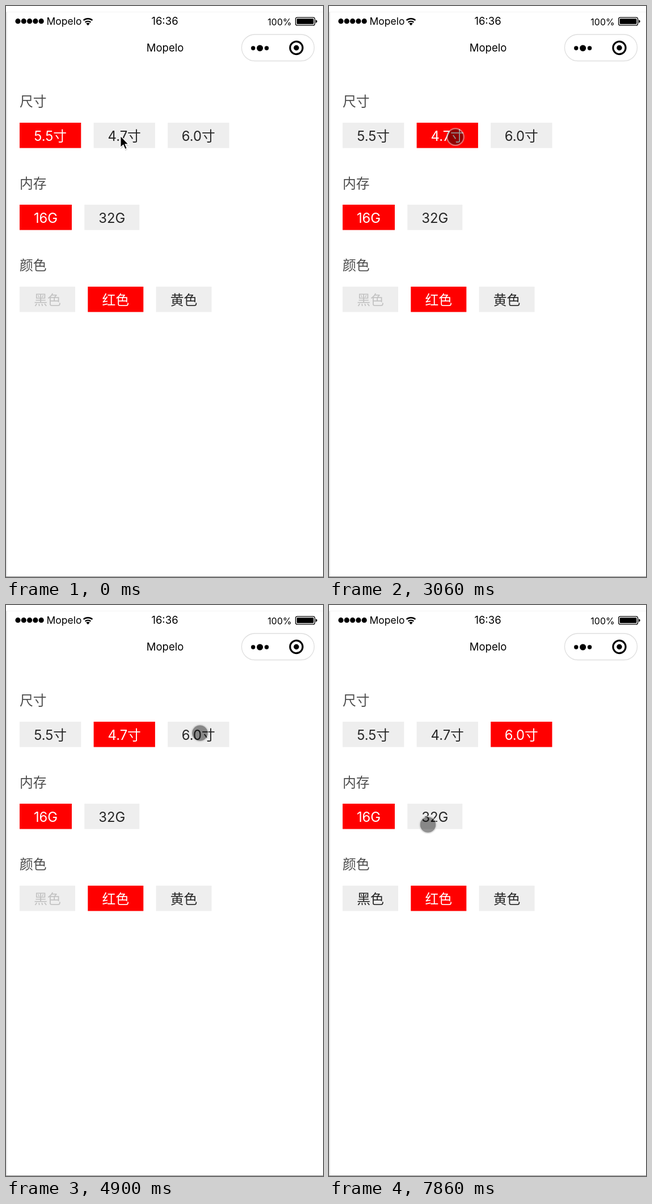
Write an HTML page that moves like this. It is 559 px wide and 1003 px high and loops after 8000 ms.

```html
<!DOCTYPE html>
<html lang="zh-CN">
<head>
<meta charset="utf-8">
<style>
  html, body { margin: 0; width: 100%; height: 100%; overflow: hidden; background: #fff; }
  svg { display: block; width: 559px; height: 1003px; }
  text { font-family: Inter, "Noto Sans CJK SC", "Noto Sans CJK", sans-serif; }
  .middle { text-anchor: middle; }
  .label, .option text { font-size: 23.8px; }
  .label { fill: #4c4c4c; }
  .option text { fill: #262626; text-anchor: middle; }
  .option rect { fill: #eee; }
  .option.selected rect { fill: #f00; }
  .option.selected text { fill: #fff; }
  .option.disabled text { fill: #c2c2c2; }
</style>
</head>
<body>
<svg viewBox="0 0 559 1003">
  <rect width="559" height="1003" fill="#fff"/>
  <path d="M0 10.5H559" stroke="#f3f3f3"/>
  <path d="M1 11V1002" stroke="#e2e2e2" stroke-width="1.6"/>
  <path d="M0 1002.5H559" stroke="#8c8c8c"/>

  <g id="signal"></g>
  <text x="71.5" y="33" font-size="17.5">Mopelo</text>
  <g fill="none" stroke="#000" stroke-width="2.3">
    <path d="M136.6 25.2A12 12 0 0 1 152.4 25.2"/>
    <path d="M139.6 28.7A7.5 7.5 0 0 1 149.4 28.7"/>
  </g>
  <path d="M141.3 30.7Q144.5 28.3 147.7 30.7L144.5 34.3Z"/>
  <text class="middle" x="280" y="33" font-size="18.5">16:36</text>
  <text class="middle" x="482.5" y="34" font-size="16">100%</text>
  <rect x="510.6" y="20.1" width="34" height="13.8" rx="3" fill="none" stroke="#000" stroke-width="1.3"/>
  <rect x="512.7" y="22.2" width="29.8" height="9.6" rx="1.4"/>
  <path d="M546.2 24.2Q548.8 25 548.8 27T546.2 29.8Z"/>

  <text class="middle" x="280.5" y="80" font-size="18.5">Mopelo</text>
  <rect x="415.5" y="50" width="128" height="46.5" rx="23.25" fill="#fff" stroke="#dedede" stroke-width="1.3"/>
  <circle cx="435.8" cy="74" r="3.7"/>
  <circle cx="447.7" cy="74" r="5.5"/>
  <circle cx="459.6" cy="74" r="3.7"/>
  <circle cx="512" cy="73.5" r="11.1" fill="none" stroke="#000" stroke-width="3.1"/>
  <circle cx="512" cy="73.5" r="4.7"/>

  <g id="form"></g>

  <g id="arrow">
    <path d="M202 229V251l5-4.3 3.2 7.3 3.8-1.6-3.2-7.2h6z" opacity=".16"/>
    <path d="M201.8 227.8V248.8l4.9-4.5 3.2 7.3 3.5-1.5-3.1-7.1h5.9z" stroke="#fff" stroke-width="1.4"/>
  </g>
  <g id="touch">
    <circle r="14" fill="#000" fill-opacity=".43"/>
    <circle r="14.8" fill="none" stroke="#d0d0d0" stroke-opacity=".5" stroke-width="2.4"/>
  </g>
</svg>
<script>
const LOOP = 8000;
const TOUCH_START = 840;
const SECOND_SIZE = 3060;
const THIRD_SIZE = 6000;

const LEFT = 24;
const FIRST_ROW = 205;
const ROW_PITCH = 144;
const GAP = 22.3;
const OPTION_HEIGHT = 44.5;

const ORIGIN = { x: 202, y: 241 };
const moves = [
  { start: 1640, end: 1960, x: 223, y: 230 },
  { start: 3600, end: 3760, x: 225, y: 232 },
  { start: 4060, end: 4780, x: 342, y: 225, sag: 47 },
  { start: 6140, end: 6280, x: 346, y: 206 },
  { start: 6400, end: 7140, x: 207, y: 338 },
  { start: 7220, end: 7860, x: 174.5, y: 386 }
];

// Option labels with their widths
const sections = {
  '尺寸': { '5.5寸': 108.3, '4.7寸': 108.3, '6.0寸': 108.3 },
  '内存': { '16G': 92, '32G': 97 },
  '颜色': { '黑色': 98, '红色': 98, '黄色': 98 }
};

const byId = id => document.getElementById(id);

function add(parent, tag, attrs, content = '') {
  const node = document.createElementNS('http://www.w3.org/2000/svg', tag);
  for (const key in attrs) node.setAttribute(key, attrs[key]);
  node.textContent = content;
  return parent.appendChild(node);
}

function addSection([title, options], row) {
  const y = FIRST_ROW + row * ROW_PITCH;
  let x = LEFT;
  add(byId('form'), 'text', { x, y: y - 29, class: 'label' }, title);
  return Object.entries(options).map(([name, width]) => {
    const option = add(byId('form'), 'g', { class: 'option' });
    add(option, 'rect', { x, y, width, height: OPTION_HEIGHT });
    add(option, 'text', { x: x + width / 2, y: y + 32 }, name);
    x += width + GAP;
    return option;
  });
}

for (let i = 0; i < 5; i++) add(byId('signal'), 'circle', { cx: 21 + i * 10.3, cy: 26.7, r: 4.6 });

const [sizes, memories, colors] = Object.entries(sections).map(addSection);
memories[0].classList.add('selected');
colors[1].classList.add('selected');

const smooth = k => k * k * (3 - 2 * k);

function pointerAt(time) {
  let { x, y } = ORIGIN;
  for (const move of moves) {
    if (time <= move.start) break;
    const k = smooth(Math.min(1, (time - move.start) / (move.end - move.start)));
    x += (move.x - x) * k;
    y += (move.y - y) * k + (move.sag ?? 0) * Math.sin(Math.PI * k);
  }
  return [x, y];
}

function render(time) {
  const chosen = time < SECOND_SIZE ? 0 : time < THIRD_SIZE ? 1 : 2;
  sizes.forEach((option, i) => option.classList.toggle('selected', i === chosen));
  colors[0].classList.toggle('disabled', chosen < 2);

  const touching = time >= TOUCH_START;
  byId('arrow').style.display = touching ? 'none' : '';
  byId('touch').style.display = touching ? '' : 'none';
  byId('touch').setAttribute('transform', `translate(${pointerAt(time)})`);
}

let start;
function tick(now) {
  start ??= now;
  render((now - start) % LOOP);
  requestAnimationFrame(tick);
}
render(0);
requestAnimationFrame(tick);
</script>
</body>
</html>
```
